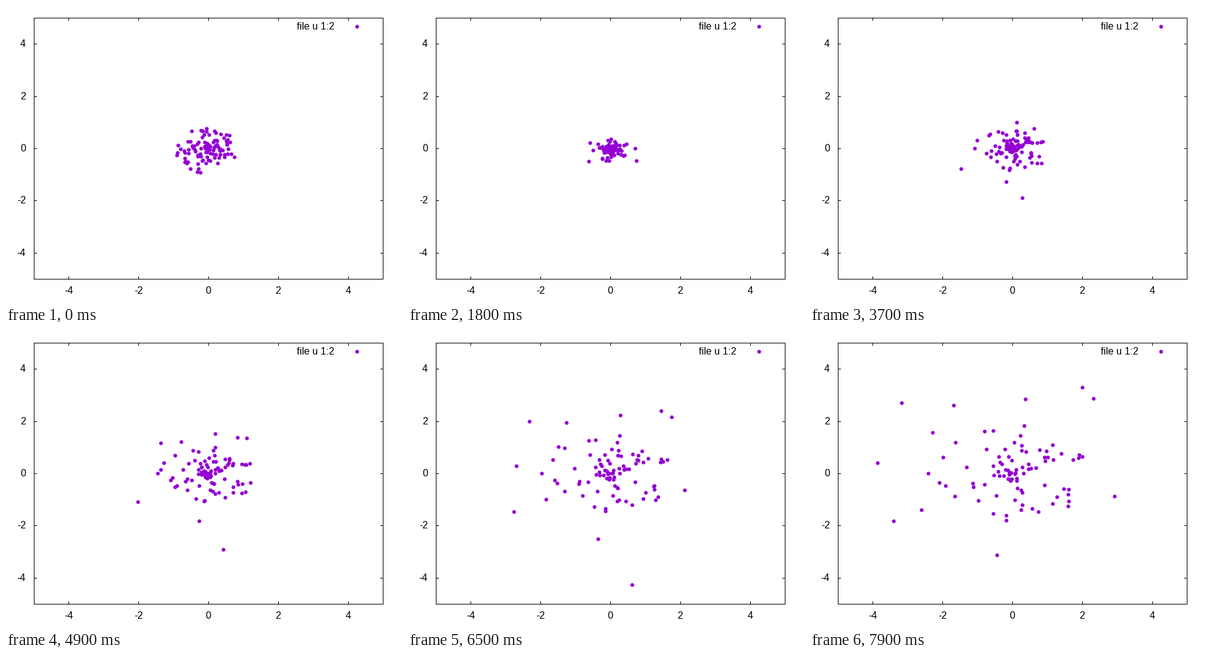
Animation, 640 px wide and 480 px high, one loop 8 s. Source, as a matplotlib script:

```python
import numpy as np
import matplotlib.pyplot as plt
from matplotlib.animation import FuncAnimation

W, H, DPI = 640, 480, 100
PX = 72 / DPI                      # one pixel in points
FRAMES, STEP = 80, 100
LEFT, RIGHT, TOP, BOTTOM = 45, 609, 19, 441
CENTRE = np.array([327, 230])
PURPLE = "#9400d3"

COUNT = 96
T_FREE, T_END = 2.7, 7.9           # start and end of the free flight

# Fastest escapers: offset from the centre at T_END, expansion rate
ESCAPERS = np.array([
    (113, -139, 0.195), (131, -121, 0.175), (21, -120, 0.155),
    (-95, -110, 0.18), (-179, -114, 0.19), (-129, -66, 0.25),
    (-218, -17, 0.215), (-192, 77, 0.135), (-147, 59, 0.21),
    (-25, 132, 0.14), (45, 230, 0.155), (165, 37, 0.195),
])

rng = np.random.default_rng(12)


def disc(n, rx, ry, power):
    """Random offsets in an ellipse, denser in the middle as power grows."""
    a = rng.uniform(0, 2 * np.pi, n)
    r = rng.uniform(0, 1, n) ** power
    return np.column_stack([rx * r * np.cos(a), ry * r * np.sin(a)])


core = COUNT - len(ESCAPERS)
end = np.vstack([ESCAPERS[:, :2], disc(core, 132, 84, 0.85) - (4, 0)])
rate = np.append(ESCAPERS[:, 2], rng.uniform(0.11, 0.17, core))
vel = end * rate[:, None]

start = disc(COUNT, 51, 37, 0.7) + (-2, 4)
start_vel = -0.25 * start


def flight(t):
    return end + vel * (t - T_END)


def places(t):
    if t >= T_FREE:
        p = flight(t)
    else:
        # Hermite curve from the starting cloud into the free flight
        s = t / T_FREE
        p = ((2 * s**3 - 3 * s**2 + 1) * start
             + (s**3 - 2 * s**2 + s) * T_FREE * start_vel
             + (3 * s**2 - 2 * s**3) * flight(T_FREE)
             + (s**3 - s**2) * T_FREE * vel)
    p = np.round(p + CENTRE)
    inside = ((p > (LEFT, TOP)) & (p < (RIGHT, BOTTOM))).all(axis=1)
    return p[inside]


plt.rcParams["font.family"] = "Liberation Sans"
fig = plt.figure(figsize=(W / DPI, H / DPI), dpi=DPI, facecolor="white")
ax = fig.add_axes([0, 0, 1, 1])
ax.set_xlim(0, W)
ax.set_ylim(H, 0)
ax.axis("off")


def rule(xs, ys):
    ax.plot(xs, ys, color="black", lw=PX, antialiased=False,
            solid_capstyle="projecting")


def label(x, y, text, align):
    ax.text(x, y + 5, text, size=16 * PX, ha=align, va="baseline",
            color="black")


def dots(xs, ys):
    return ax.plot(xs, ys, "o", color=PURPLE, ms=6.1 * PX, mew=0,
                   antialiased=False)[0]


rule([LEFT, RIGHT, RIGHT, LEFT, LEFT], [TOP, TOP, BOTTOM, BOTTOM, TOP])
for n in range(-4, 5, 2):
    x = round(CENTRE[0] + 56.4 * n)
    y = round(CENTRE[1] - 42.2 * n)
    rule([x, x], [BOTTOM, BOTTOM - 4])
    rule([x, x], [TOP, TOP + 4])
    rule([LEFT, LEFT + 4], [y, y])
    rule([RIGHT, RIGHT - 4], [y, y])
    label(x, 460, str(n), "center")
    label(32, y, str(n), "right")

label(531, 33, "file u 1:2", "right")
dots([567], [33])
cloud = dots([], [])


def update(i):
    cloud.set_data(*places(i * STEP / 1000).T)
    return [cloud]


anim = FuncAnimation(fig, update, frames=FRAMES, interval=STEP,
                     repeat=True, repeat_delay=0, blit=False)
plt.show()
```
